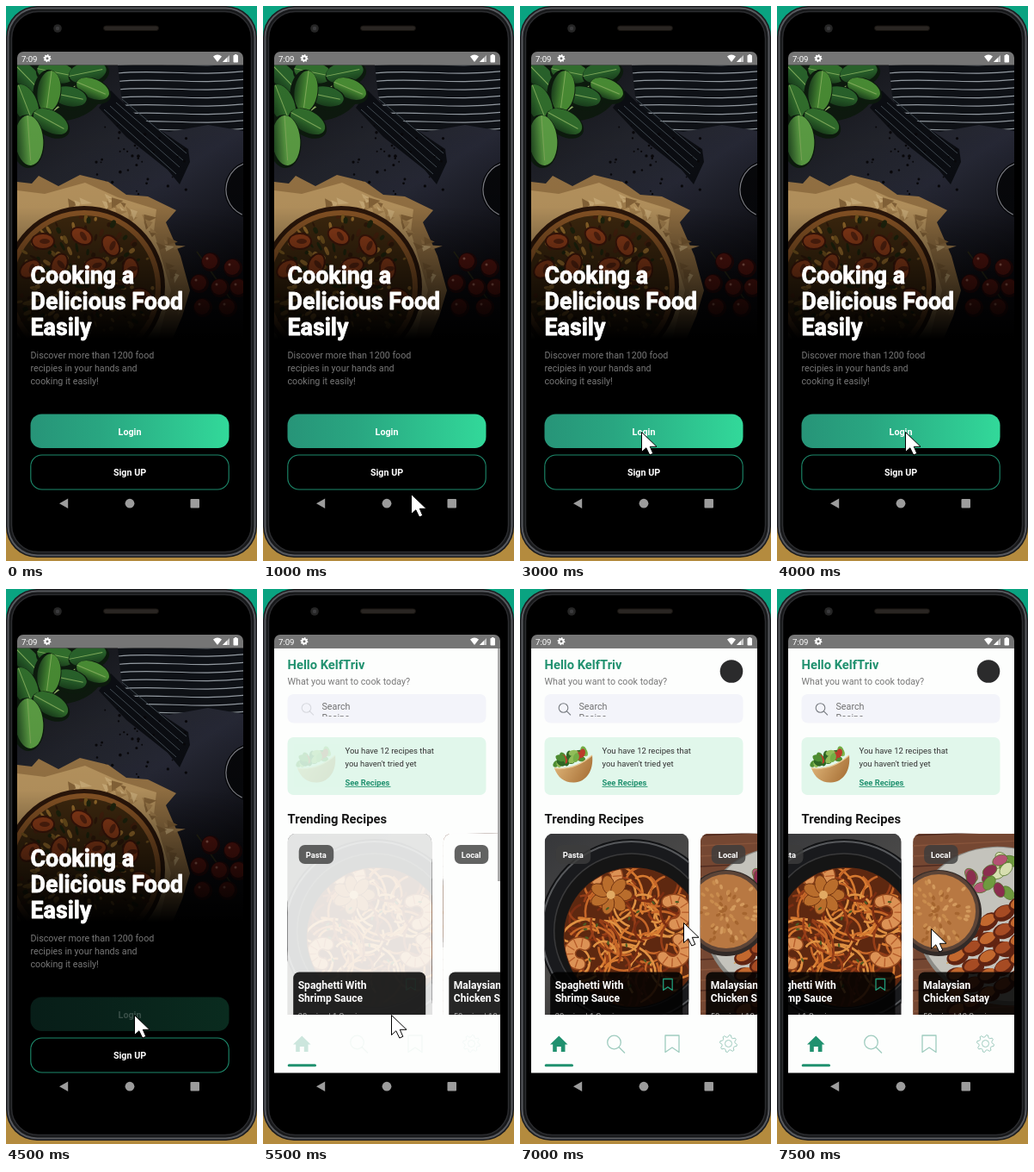
Recreate the animation shown at these times as an HTML page with a canvas. Size 292x644 px, loop 8 s.

```html
<!DOCTYPE html>
<html lang="en">
<head>
<meta charset="utf-8">
<title>Recipe app</title>
<style>
html, body { margin: 0; width: 100%; height: 100%; overflow: hidden; background: #000; }
canvas { display: block; width: 292px; height: 644px; }
</style>
</head>
<body>
<canvas id="stage"></canvas>
<script>
const W = 292, H = 644, LOOP = 8000, STEP = 500;
const TEAL = '#20916f', FAMILY = 'Roboto, "Open Sans", sans-serif';
const canvas = document.getElementById('stage');
const c = canvas.getContext('2d');
const dpr = window.devicePixelRatio || 1;
canvas.width = W * dpr;
canvas.height = H * dpr;

// Pointer tip for each half second; null while hidden.
const POINTER = [null, null, [172, 566], [139, 443], [128, 527], [188, 553], [141, 494], [149, 493],
  [149, 494], [149, 494], [149, 494], [149, 494], [149, 494], [189, 387], [190, 387], [179, 394]];

function seeded(seed) {
  return () => (seed = (seed * 16807) % 2147483647) / 2147483647;
}
function layer(draw, alpha = 1) {
  c.save();
  c.globalAlpha *= alpha;
  draw();
  c.restore();
}
function paint(fill, stroke, width = 1) {
  if (fill) { c.fillStyle = fill; c.fill(); }
  if (stroke) { c.strokeStyle = stroke; c.lineWidth = width; c.stroke(); }
}
function box(x, y, w, h, r, fill, stroke, width) {
  c.beginPath();
  c.roundRect(x, y, w, h, r);
  paint(fill, stroke, width);
}
function disc(x, y, r, fill, stroke, width) {
  c.beginPath();
  c.arc(x, y, r, 0, 7);
  paint(fill, stroke, width);
}
function oval(x, y, rx, ry, turn, fill, stroke, width) {
  c.beginPath();
  c.ellipse(x, y, rx, ry, turn, 0, 7);
  paint(fill, stroke, width);
}
function arc(x, y, r, from, to, stroke, width) {
  c.beginPath();
  c.arc(x, y, r, from, to);
  paint(null, stroke, width);
}
function poly(points, fill, stroke, width) {
  c.beginPath();
  for (let i = 0; i < points.length; i += 2) c.lineTo(points[i], points[i + 1]);
  c.closePath();
  paint(fill, stroke, width);
}
function line(x1, y1, x2, y2, stroke, width) {
  c.beginPath();
  c.moveTo(x1, y1);
  c.lineTo(x2, y2);
  paint(null, stroke, width);
}
function text(str, x, y, size, fill, weight = 400, align = 'left') {
  c.font = `${weight} ${size}px ${FAMILY}`;
  c.textAlign = align;
  c.fillStyle = fill;
  c.fillText(str, x, y);
}
function heading(str, x, y) {
  text(str, x, y, 26.8, '#fff', 700);
  c.strokeStyle = '#fff';
  c.lineWidth = 0.8;
  c.lineJoin = 'round';
  c.strokeText(str, x, y);
}
function clip(x, y, w, h, r = 0) {
  c.beginPath();
  c.roundRect(x, y, w, h, r);
  c.clip();
}
function ramp(x1, y1, x2, y2, ...stops) {
  const g = c.createLinearGradient(x1, y1, x2, y2);
  stops.forEach(([at, color]) => g.addColorStop(at, color));
  return g;
}

function gear(x, y, r, teeth, fill, stroke) {
  c.beginPath();
  for (let i = 0; i < teeth * 4; i++) {
    const a = (i + 0.5) / (teeth * 4) * Math.PI * 2;
    const d = i % 4 < 2 ? r : r * 0.76;
    c.lineTo(x + Math.cos(a) * d, y + Math.sin(a) * d);
  }
  c.closePath();
  paint(fill, stroke, 1);
}
function lens(x, y, r, color, width) {
  disc(x, y, r, null, color, width);
  line(x + r * 0.7, y + r * 0.7, x + r * 1.6, y + r * 1.6, color, width);
}
function bookmark(x, y, w, h, color, width) {
  poly([x, y, x + w, y, x + w, y + h, x + w / 2, y + h * 0.72, x, y + h], null, color, width);
}

function phone() {
  c.fillStyle = '#0aa381';
  c.fillRect(0, 0, W, H / 2);
  c.fillStyle = '#b48b3e';
  c.fillRect(0, H / 2, W, H / 2);
  box(0, 0, 292, 640, 36, '#1b1c1f');
  box(2.5, 2.5, 287, 635, 34, '#17181a', '#56585d', 2);
  box(6.5, 6.5, 279, 627, 31, '#000', '#2b2c2f', 1.5);
  disc(60, 26, 4.8, '#252525');
  disc(60, 26, 2.2, '#3b3b3d');
  box(113.5, 23, 64, 5.5, 2.7, '#292522', '#16130f', 1);
}

function statusBar() {
  c.fillStyle = '#000';
  c.fillRect(13, 53, 263, 15.5);
  box(13, 53, 263, 15.5, [7, 7, 0, 0], '#757575');
  text('7:09', 18, 64.5, 9.6, '#fff');
  gear(48, 60.7, 4.6, 8, '#fff');
  disc(48, 60.7, 1.5, '#757575');
  c.beginPath();
  c.moveTo(246, 65);
  c.lineTo(241, 58.6);
  c.quadraticCurveTo(246, 54.6, 251, 58.6);
  c.closePath();
  paint('#fff');
  poly([252, 65, 260, 65, 260, 57], '#c9c9c9');
  poly([252, 65, 257, 65, 257, 60], '#fff');
  box(264.5, 57, 5.5, 8.5, 0.8, '#fff');
  box(266, 56, 2.5, 2, 0, '#fff');
}

function navBar() {
  const gray = '#9c9c9c';
  poly([62, 577.2, 72.2, 571.5, 72.2, 583], gray);
  disc(144, 577.2, 5.4, gray);
  box(214.5, 572, 10.5, 10.5, 1, gray);
}

function leaf(x, y, len, turn, color) {
  c.save();
  c.translate(x, y);
  c.rotate(turn);
  oval(1, 2, len + 2, len * 0.6 + 2, 0, '#0c1a0d');
  oval(0, 0, len, len * 0.56, 0, ramp(0, -len * 0.6, 0, len * 0.6, [0, color], [0.5, color], [1, '#17391a']));
  line(-len, 0, len * 0.8, 0, '#7fa95a', 1);
  c.restore();
}

function introPhoto() {
  const rnd = seeded(42);
  clip(13, 68, 263, 325);
  c.fillStyle = ramp(90, 68, 250, 320, [0, '#15161b'], [0.3, '#22242c'], [0.55, '#272936'], [1, '#0b0b10']);
  c.fillRect(13, 68, 263, 325);

  // striped cloth
  c.save();
  poly([130, 68, 276, 68, 276, 145, 235, 138, 190, 146, 146, 140, 134, 104], '#0e1116');
  c.clip();
  for (let i = 0; i < 9; i++) {
    const y = 66 + i * 9.5;
    c.beginPath();
    c.moveTo(126, y + 3);
    c.bezierCurveTo(170, y - 3, 220, y + 7, 280, y);
    paint(null, '#959ca3', 1.2);
  }
  c.restore();
  poly([122, 98, 146, 122, 212, 166, 214, 181, 202, 207, 188, 190, 140, 152, 108, 118], '#0b0d12');
  for (let i = 0; i < 4; i++) line(114 + i * 7, 120 - i * 4, 198 + i * 4, 195 - i * 8, '#48525a', 0.9);

  for (let i = 0; i < 38; i++) {
    disc(105 + rnd() * 105, 138 + rnd() * 82, 0.8 + rnd() * 1.1, '#08070a');
  }
  disc(288, 213, 34, '#07080b');
  arc(288, 213, 32, 2, 4.4, '#85868d', 1.2);

  // spinach
  const greens = ['#28602a', '#488a33', '#316d2c', '#5c9e44'];
  oval(48, 92, 66, 42, 0.1, '#0d190e');
  for (let i = 0; i < 6; i++) line(16 + i * 6, 128, 46 + i * 9, 80 + i * 3, '#8cac62', 2);
  leaf(24, 82, 22, 0.8, greens[0]);
  leaf(58, 77, 22, 0.2, greens[2]);
  leaf(95, 77, 22, -0.2, greens[0]);
  leaf(101, 96, 20, 0.4, greens[1]);
  leaf(74, 105, 20, 0.2, greens[0]);
  leaf(50, 99, 24, 1.7, greens[1]);
  leaf(23, 114, 24, 1.2, greens[2]);
  leaf(52, 134, 22, 0.5, greens[2]);
  leaf(27, 156, 29, 1.5, greens[3]);

  // parchment
  poly([13, 204, 30, 206, 38, 197, 61, 209, 86, 196, 119, 204, 140, 219, 165, 221, 198, 237,
    186, 251, 203, 290, 214, 330, 205, 360, 190, 395, 13, 395], '#9a7646');
  poly([13, 214, 45, 218, 92, 205, 130, 222, 175, 236, 172, 262, 192, 330, 175, 395, 13, 395], '#bd9962');
  for (let i = 0; i < 34; i++) {
    const a = -1.8 + rnd() * 2, d = 96 + rnd() * 18;
    const x = 91 + Math.cos(a) * d, y = 326 + Math.sin(a) * d;
    poly([x, y, x + 5 + rnd() * 10, y + rnd() * 7, x + rnd() * 5, y + 5 + rnd() * 9],
      ['#8a673a', '#d0b07a', '#a98450'][i % 3]);
  }

  // pie
  disc(91, 326, 94, '#2d170a');
  disc(91, 326, 89, '#8e5827');
  disc(91, 326, 83, '#412a0f');
  for (let i = 0; i < 260; i++) {
    const a = rnd() * 6.3, d = Math.sqrt(rnd()) * 81;
    const color = ['#7d5a20', '#20260d', '#4a230e', '#9c6f2d', '#321a0a'][i % 5];
    oval(91 + Math.cos(a) * d, 326 + Math.sin(a) * d, 1.5 + rnd() * 4, 1 + rnd() * 2, a, color);
  }
  [[43, 273], [88, 267], [122, 278], [145, 305], [62, 300], [28, 305], [104, 301], [158, 337]]
    .forEach(([x, y], i) => {
      oval(x, y, 14, 10, i * 0.5, '#42180a');
      oval(x, y, 12, 8, i * 0.5, '#96401a');
      oval(x + 2, y, 6, 3, i, '#5e2610');
    });

  // tomatoes
  line(222, 285, 268, 350, '#2a2a16', 1.5);
  [[238, 297], [264, 304], [225, 322], [249, 327], [271, 327], [229, 350], [258, 350]].forEach(([x, y]) => {
    disc(x, y, 11, '#26090a');
    disc(x - 1, y - 1, 9, '#59150f');
    disc(x - 4, y - 4, 1.5, '#a8695a');
  });

  c.fillStyle = ramp(0, 68, 0, 386, [0, 'rgba(0,0,0,0)'], [0.52, 'rgba(0,0,0,.08)'], [0.8, 'rgba(0,0,0,.58)'], [1, '#000']);
  c.fillRect(13, 68, 263, 330);
}

function intro(pressed) {
  layer(introPhoto);
  ['Cooking a', 'Delicious Food', 'Easily'].forEach((s, i) => heading(s, 28.5, 321.5 + i * 30));
  ['Discover more than 1200 food', 'recipies in your hands and', 'cooking it easily!']
    .forEach((s, i) => text(s, 28.5, 409 + i * 14.8, 10.72, '#777'));
  layer(() => {
    box(28.5, 473.5, 231, 39.5, 13, ramp(28, 0, 260, 0, [0, '#279478'], [0.35, '#29a681'], [1, '#32d99a']));
    text('Login', 144, 497.5, 10.72, '#fff', 700, 'center');
  }, pressed ? 0.2 : 1);
  box(28.8, 521, 230.4, 40, 13, '#000', '#1d8a6c', 1.1);
  text('Sign UP', 144, 545, 10.72, '#fff', 700, 'center');
}

function shrimp(x, y, r, from) {
  c.lineCap = 'round';
  arc(x, y, r, from, from + 3.6, '#92451c', 15);
  arc(x, y, r, from, from + 3.6, '#dc9255', 12);
  for (let i = 0; i < 6; i++) {
    const a = from + 0.3 + i * 0.6, k = Math.cos(a), s = Math.sin(a);
    line(x + k * (r - 4), y + s * (r - 4), x + k * (r + 5), y + s * (r + 5), '#b65d2b', 1.4);
  }
}

function pasta(x) {
  const rnd = seeded(77);
  c.fillStyle = ramp(x, 284, x + 167, 494, [0, '#36373a'], [0.5, '#4b4a49'], [1, '#252426']);
  c.fillRect(x, 284, 168, 211);
  c.save();
  c.translate(x + 101, 397);
  disc(0, 0, 107, '#111214');
  disc(0, 0, 104, '#191a1d', '#56585b', 2);
  disc(0, 0, 90, '#151515', '#39393a', 1.5);
  disc(2, 7, 81, '#5e2810');
  disc(2, 7, 80);
  c.clip();
  const tones = ['#c56628', '#e09243', '#963e18', '#d67a30', '#7b2d12'];
  for (let i = 0; i < 140; i++) {
    const a = rnd() * 6.3, d = Math.sqrt(rnd()) * 73, from = rnd() * 6.3;
    arc(Math.cos(a) * d, 7 + Math.sin(a) * d, 10 + rnd() * 27, from, from + 1 + rnd() * 1.6, tones[i % 5], 2.6);
  }
  shrimp(49, -22, 14, 4.2);
  shrimp(-29, -63, 12, 2.9);
  shrimp(48, 22, 14, 5.2);
  shrimp(-60, 26, 12, 1.6);
  for (let i = 0; i < 7; i++) {
    const a = i * 0.9;
    oval(-24 + Math.cos(a) * 14, -42 + Math.sin(a) * 12, 11, 7, a, '#b96d2c', '#713411', 1);
  }
  disc(-24, -42, 5, '#e1aa63');
  for (let i = 0; i < 16; i++) oval(rnd() * 110 - 55, rnd() * 110 - 40, 2.4, 1.2, rnd() * 3, '#4c5d24');
  c.restore();
}

function satay(x) {
  const rnd = seeded(15);
  c.fillStyle = '#754732';
  c.fillRect(x, 284, 168, 211);
  for (let i = 0; i < 18; i++) line(x, 286 + i * 12, x + 168, 278 + i * 12, i % 3 ? '#87543b' : '#4f2b20', 1.4);
  oval(x + 106, 391, 104, 91, 0.3, '#8c8c87');
  oval(x + 106, 389, 101, 88, 0.3, '#c4c3bc');
  for (let i = 0; i < 17; i++) {
    const px = x + 63 + rnd() * 54, py = 313 + rnd() * 40;
    oval(px, py, 9, 6, rnd() * 3, ['#8b2d4e', '#6f9a3f', '#d7dfb0', '#b55274'][i % 4], '#55752c', 0.8);
  }
  c.lineCap = 'round';
  for (let row = 0; row < 5; row++) {
    const y = 391 + row * 21;
    line(x + 40, y + 22, x + 170, y - 50, '#d2a466', 2);
    for (let i = 0; i < 6; i++) {
      const px = x + 52 + i * 18, py = y + 15 - i * 10;
      oval(px, py, 13, 9, rnd() - 0.8, '#612412');
      oval(px - 1, py - 2, 10, 6, -0.5, i % 2 ? '#a64b23' : '#c2682e');
    }
  }
  disc(x + 30, 376, 50, '#322a27');
  disc(x + 30, 374, 47, '#5c4437');
  disc(x + 30, 374, 43, '#b87842');
  for (let i = 0; i < 70; i++) {
    const a = rnd() * 6.3, d = Math.sqrt(rnd()) * 39;
    oval(x + 30 + Math.cos(a) * d, 374 + Math.sin(a) * d, 3, 1.8, a, ['#d39a5d', '#a5652f', '#c98c4e'][i % 3]);
  }
}

// Covers a picture that is still fading in.
function veil(x, y, w, h, color, alpha) {
  layer(() => box(x, y, w, h, 0, color), alpha);
}

function card(x, photo, shown, tag, title, meta, markAlpha) {
  layer(() => {
    clip(x, 283.5, 167.5, 230, 10);
    photo(x);
    veil(x, 283, 168, 231, '#fdfefd', 1 - shown);
  });
  box(x + 13, 297, tag === 'Pasta' ? 40.5 : 39.5, 22, 7, 'rgba(60,60,60,.8)');
  text(tag, x + 21, 311.5, 9.4, '#fff', 700);
  box(x + 6.5, 444.5, 154, 70, 7, 'rgba(0,0,0,.85)');
  title.forEach((s, i) => text(s, x + 12, 464 + i * 15, 12.06, '#fff', 700));
  text(meta, x + 12, 499, 9.4, '#b5b5b5');
  layer(() => bookmark(x + 138, 452.5, 10.5, 13, '#1f9a78', 1.3), markAlpha);
}

function bowl() {
  const rnd = seeded(9);
  const tones = ['#4e8d32', '#73ad45', '#2f6624', '#bb3c2b', '#91bd59'];
  for (let i = 0; i < 32; i++) {
    const t = rnd();
    oval(43 + t * 36, 204 - t * 9 - rnd() * 9, 5.5, 3.4, rnd() * 3, tones[i % 5]);
  }
  c.beginPath();
  c.moveTo(40, 208);
  c.quadraticCurveTo(63, 211, 84, 193);
  c.bezierCurveTo(86, 211, 77, 224, 63, 224.5);
  c.bezierCurveTo(52, 225, 44, 219, 40, 208);
  paint(ramp(45, 205, 78, 224, [0, '#d8ac70'], [1, '#a97238']));
  c.beginPath();
  c.moveTo(40, 208);
  c.quadraticCurveTo(63, 211, 84, 193);
  paint(null, '#e9c792', 1.4);
}

function home(loaded, scroll, bar) {
  c.fillStyle = '#fdfefd';
  c.fillRect(13, 68, 263, 493.5);
  text('Hello KelfTriv', 28.5, 93, 14.74, TEAL, 700);
  text('What you want to cook today?', 28.5, 111, 10.72, '#777');
  if (loaded) disc(246, 95.5, 13.3, '#2b2b2c');

  box(28.5, 122, 231, 33.5, 7, '#f3f4fa');
  layer(() => lens(50.5, 138, 5.3, '#777b80', 1.1), loaded ? 1 : 0.22);
  layer(() => {
    clip(60, 122, 190, 26);
    text('Search', 68.5, 140, 10.72, '#707070');
    text('Recipe', 68.5, 153, 10.72, '#707070');
  });

  box(28.5, 172, 231, 67, 7, '#e1f7eb');
  bowl();
  veil(36, 180, 54, 50, '#e1f7eb', loaded ? 0 : 0.87);
  text('You have 12 recipes that', 95.5, 191, 9.5, '#333');
  text("you haven't tried yet", 95.5, 206, 9.5, '#333');
  text('See Recipes', 95.5, 227.5, 9.4, TEAL, 700);
  line(95.5, 229.4, 148.5, 229.4, TEAL, 0.9);
  text('Trending Recipes', 28.5, 271.5, 14.74, '#151515', 700);

  layer(() => {
    clip(13, 280, 263, 214);
    card(28.7 - scroll, pasta, loaded ? 1 : 0.13, 'Pasta', ['Spaghetti With', 'Shrimp Sauce'],
      '30 mins | 1 Serving', loaded ? 1 : 0.08);
    card(209.8 - scroll, satay, loaded ? 1 : 0, 'Local', ['Malaysian', 'Chicken Satay'],
      '50 mins | 10 Serving', loaded ? 1 : 0.08);
  });

  layer(() => {
    poly([45.3, 518.5, 55.5, 528.5, 52.5, 528.5, 52.5, 537, 47.8, 537, 47.8, 531, 42.8, 531,
      42.8, 537, 38.2, 537, 38.2, 528.5, 35, 528.5], TEAL);
  }, loaded ? 1 : 0.22);
  layer(() => {
    const pale = '#9fccbf';
    lens(109.5, 526, 7.8, pale, 1.3);
    bookmark(169, 518, 16, 19.5, pale, 1.3);
    gear(242.5, 527.5, 10, 8, null, pale);
    disc(242.5, 527.5, 4, null, pale, 1);
  }, loaded ? 1 : 0.1);
  box(28.7, 551.3, 33.3, 3, 1.5, TEAL);
  if (bar) box(273, 68.5, 3, 270.5, 0, '#a9a9a9');
}

function pointer([x, y]) {
  c.save();
  c.translate(x + 0.5, y + 0.5);
  c.lineJoin = 'miter';
  poly([0, 0, 0, 23, 5.3, 18.3, 9.3, 26.5, 13.3, 24.8, 9.8, 16.8, 17.5, 16.8], '#fff', '#000', 1);
  c.restore();
}

function render(time) {
  const step = Math.floor((time % LOOP) / STEP);
  c.setTransform(dpr, 0, 0, dpr, 0, 0);
  phone();
  if (step < 11) intro(step >= 9);
  else home(step >= 12, step === 15 ? 51.7 : 0, step < 14);
  statusBar();
  navBar();
  if (POINTER[step]) pointer(POINTER[step]);
}

const start = performance.now();
function tick() {
  render(performance.now() - start);
  requestAnimationFrame(tick);
}
tick();
</script>
</body>
</html>
```
